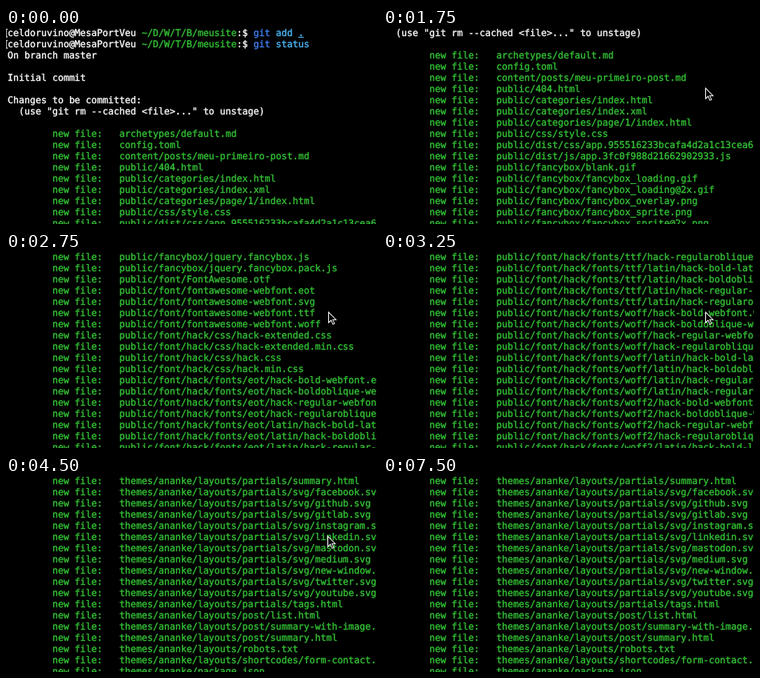
An HTML page for the animation above (9.25 s loop, 464 by 245 pixels).

```html
<!DOCTYPE html>
<html lang="pt">
<head>
<meta charset="utf-8">
<title>git status</title>
<style>
  html, body { margin: 0; width: 100%; height: 100%; overflow: hidden; background: #000; }
  #stage { position: relative; width: 464px; height: 245px; overflow: hidden; background: #000; }
  #log {
    position: absolute; left: 2px; top: -1px; margin: 0; white-space: pre; color: #fff;
    font: 11.627px/14px "DejaVu Sans Mono", "Liberation Mono", monospace;
    text-rendering: geometricPrecision;
    -webkit-text-stroke: 0.35px currentColor;
  }
  #log div { position: relative; height: 14px; }
  .mark { position: absolute; left: -5px; color: #ddd; }
  .green { color: #34c436; }
  .cmd { color: #3f82f5; }
  .arg { color: #4db9fa; }
  .path { text-decoration: underline; }
  #pointer { position: absolute; left: 0; top: 0; }
</style>
</head>
<body>
<div id="stage">
  <div id="log"></div>
  <svg id="pointer" width="11" height="17" viewBox="0 0 11 17">
    <path fill="#fff" d="M0 0V15.4L3.5 12.2L5.7 17L8.5 15.8L6.4 11.2H11Z"/>
    <path d="M1 2.4V13.1L3.8 10.5L6.1 15.7L7.3 15.2L5 10.2H8.8Z"/>
  </svg>
</div>
<script>
const LOOP = 9250, ROW = 14;

const log = document.getElementById("log");
const pointer = document.getElementById("pointer");

const span = (cls, text) => `<span class="${cls}">${text}</span>`;
const prompt = (arg) =>
  span("mark", "[") + "celdoruvino@MesaPortVeu " + span("green", "~/D/W/T/B/meusite") +
  ":$ " + span("cmd", "git") + " " + arg;
const group = (prefix, names) => names.split(" ").map((name) => prefix + name);

const hackFonts = ["eot", "svg", "ttf", "woff", "woff2"].flatMap((type) =>
  ["", "latin/"].flatMap((dir) =>
    ["bold", "boldoblique", "regular", "regularoblique"].map((face) =>
      `public/font/hack/fonts/${type}/${dir}hack-${face}${dir ? "-latin" : ""}-webfont.${type}`)));

const files = [
  ...group("", "archetypes/default.md config.toml content/posts/meu-primeiro-post.md"),
  ...group("public/", "404.html categories/index.html categories/index.xml categories/page/1/index.html " +
    "css/style.css dist/css/app.955516233bcafa4d2a1c13cea6.css dist/js/app.3fc0f988d21662902933.js"),
  ...group("public/fancybox/", "blank.gif fancybox_loading.gif fancybox_loading@2x.gif " +
    "fancybox_overlay.png fancybox_sprite.png fancybox_sprite@2x.png"),
  ...group("public/fancybox/helpers/", "fancybox_buttons.png jquery.fancybox-buttons.css " +
    "jquery.fancybox-buttons.js jquery.fancybox-media.js jquery.fancybox-thumbs.css jquery.fancybox-thumbs.js"),
  ...group("public/fancybox/jquery.fancybox.", "css js pack.js"),
  "public/font/FontAwesome.otf",
  ...group("public/font/fontawesome-webfont.", "eot svg ttf woff"),
  ...group("public/font/hack/css/hack", "-extended.css -extended.min.css .css .min.css"),
  ...hackFonts,
  ...group("public/img/", "favicon.ico icon-192.png icon.png logo.svg pacman.jpg"),
  ...group("public/", "index.html index.xml js/academic.min.76a41a243fcea75defe7d35.js " +
    "js/jquery-2.1.0.min.js js/vendor/reveal.js/plugin/notes/notes.html " +
    "js/vendor/reveal.js/plugin/notes/notes.js site.webmanifest sitemap.xml " +
    "tags/index.html tags/index.xml tags/page/1/index.html"),
  ...group("resources/_gen/assets/js/js/academic-bundle-pre.js", ".content .json"),
  ...group("themes/ananke/layouts/", "404.html _default/baseof.html _default/list.html " +
    "_default/single.html _default/summary-with-image.html _default/summary.html " +
    "_default/taxonomy.html _default/terms.html index.html page/single.html"),
  ...group("themes/ananke/layouts/partials/", "i18nlist.html menu-contextual.html page-header.html " +
    "site-favicon.html site-footer.html site-header.html site-navigation.html site-scripts.html " +
    "social-follow.html social-share.html summary-with-image.html summary.html"),
  ...group("themes/ananke/layouts/partials/svg/", "facebook.svg github.svg gitlab.svg instagram.svg " +
    "linkedin.svg mastodon.svg medium.svg new-window.svg twitter.svg youtube.svg"),
  ...group("themes/ananke/layouts/", "partials/tags.html post/list.html post/summary-with-image.html " +
    "post/summary.html robots.txt shortcodes/form-contact.html"),
  "themes/ananke/package.json",
];

const rows = [
  prompt(span("arg", "add " + span("path", "."))),
  prompt(span("arg", "status")),
  "On branch master",
  "",
  "Initial commit",
  "",
  "Changes to be committed:",
  '  (use "git rm --cached &lt;file&gt;..." to unstage)',
  "",
  ...files.map((file) => span("green", "        new file:   " + file)),
];
log.innerHTML = rows.map((row) => `<div>${row}</div>`).join("");

// [time, top row]
const lastTop = rows.length - 18;
const scroll = [
  [0, 0], [1250, 1], [1500, 3], [1750, 7], [2000, 10], [2250, 15], [2500, 22],
  [2750, 32], [3000, 45], [3250, 62], [3500, 83], [4000, lastTop - 22], [4500, lastTop],
];

// [time, x, y]; no position means hidden
const moves = [
  [0], [500, 456, 6], [750, 403, 60], [1000, 404, 71], [1250, 403, 74], [3750, 402, 74],
  [5000, 402, 75], [5500, 404, 74], [5750, 403, 91], [6250, 398, 117], [6500, 396, 140],
  [6750, 401, 200], [7000],
];

const stepAt = (steps, t) => steps.findLast(([start]) => start <= t);

function draw() {
  const t = performance.now() % LOOP;
  const [, top] = stepAt(scroll, t);
  const [, x, y] = stepAt(moves, t);
  log.style.transform = `translateY(${-top * ROW}px)`;
  pointer.style.visibility = x === undefined ? "hidden" : "visible";
  if (x !== undefined) pointer.style.transform = `translate(${x}px, ${y}px)`;
  requestAnimationFrame(draw);
}
draw();
</script>
</body>
</html>
```
